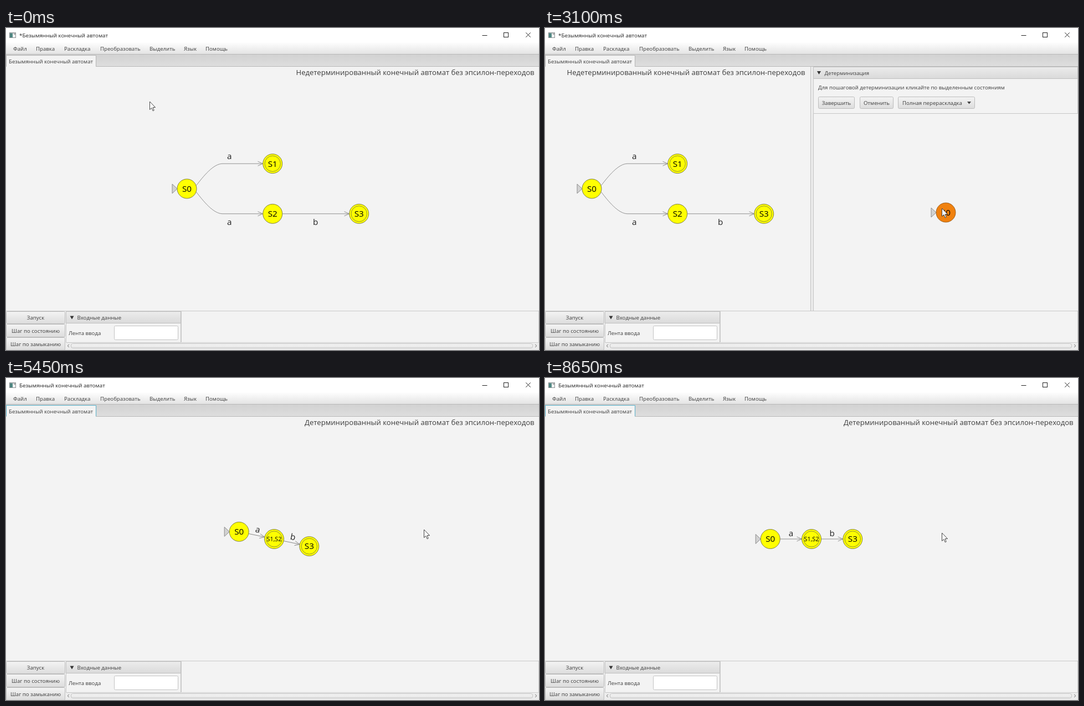
Recreate the animation shown at these times as an HTML page with a canvas. Size 962 by 582 pixels, loop 8.7 s.

```html
<!DOCTYPE html>
<html lang="ru">
<head>
<meta charset="utf-8">
<title>Конечный автомат</title>
<style>
html, body { margin: 0; width: 100%; height: 100%; overflow: hidden; background: #f3f3f3; }
canvas { display: block; }
</style>
</head>
<body>
<canvas id="stage" width="962" height="582"></canvas>
<script>
const ctx = document.getElementById('stage').getContext('2d');
const LOOP = 8700;
const FONT = '"Open Sans", "Noto Sans", sans-serif';
const UI = 9.65;
const INK = '#3c3c3c', EDGE = '#858585', BG = '#f3f3f3';
const YELLOW = '#ffff02', ORANGE = '#f0810f';
const MENU = [['Файл', 13], ['Правка', 54], ['Раскладка', 105], ['Преобразовать', 170],
  ['Выделить', 259], ['Язык', 321], ['Помощь', 360]];

// Moments at which the interface switches state
const MENU_HOVER = 700, MENU_OPEN = 850, MENU_CLOSE = 2000, SPLIT = 2200,
  FIRST_CLICK = 3200, SECOND_CLICK = 4100, DIALOG = 4550, DONE = 5300;

// Rows of [time, values...]
const CURSOR = [[0, 259, 133], [150, 259, 133], [750, 207, 34], [1000, 207, 34], [1550, 250, 93],
  [2250, 250, 93], [2900, 716, 326], [3250, 716, 326], [3700, 753, 335], [4000, 753, 335],
  [4450, 751, 328], [4750, 751, 328], [5100, 763, 273], [5350, 763, 273], [5700, 717, 280],
  [6000, 717, 280], [6500, 716, 280]];
const PAIR = [[FIRST_CLICK, 34, 12.6], [3900, 60.5, 12.6], [SECOND_CLICK, 64, 12.4]];
const TRIPLE = [[SECOND_CLICK, 28, 11], [DIALOG, 36, 10]];
// time, centre x, spacing, angle
const RESULT = [[DONE, 484, 62, 13], [6000, 484, 74.4, 7.2], [6500, 483, 74.5, 3.2],
  [7000, 482, 74.5, 1], [7500, 481.2, 74.5, 0.2], [8650, 481, 74.3, 0]];

function track(rows, t, ease = u => u) {
  if (t <= rows[0][0]) return rows[0].slice(1);
  for (let i = 1; i < rows.length; i++) {
    const a = rows[i - 1], b = rows[i];
    if (t < b[0]) {
      const u = ease((t - a[0]) / (b[0] - a[0]));
      return a.slice(1).map((v, k) => v + (b[k + 1] - v) * u);
    }
  }
  return rows[rows.length - 1].slice(1);
}
const smooth = u => u * u * (3 - 2 * u);

function text(s, x, base, size = UI, color = INK, align = 'left', font = FONT) {
  ctx.font = `${size}px ${font}`;
  ctx.textAlign = align;
  ctx.fillStyle = color;
  ctx.fillText(s, x, base);
}

function line(color, width, ...p) {
  ctx.beginPath();
  ctx.moveTo(p[0], p[1]);
  for (let i = 2; i < p.length; i += 2) ctx.lineTo(p[i], p[i + 1]);
  ctx.strokeStyle = color;
  ctx.lineWidth = width;
  ctx.stroke();
}

function poly(fill, stroke, ...p) {
  ctx.beginPath();
  for (let i = 0; i < p.length; i += 2) ctx.lineTo(p[i], p[i + 1]);
  ctx.closePath();
  ctx.fillStyle = fill;
  ctx.fill();
  if (stroke) {
    ctx.strokeStyle = stroke;
    ctx.lineWidth = 1;
    ctx.stroke();
  }
}

function rect(x, y, w, h, fill) {
  ctx.fillStyle = fill;
  ctx.fillRect(x, y, w, h);
}

function shade(y, h, top, bottom) {
  const g = ctx.createLinearGradient(0, y, 0, y + h);
  g.addColorStop(0, top);
  g.addColorStop(1, bottom);
  return g;
}

function box(x, y, w, h, r, fill, stroke, width = 1) {
  ctx.beginPath();
  ctx.roundRect(x + 0.5, y + 0.5, w - 1, h - 1, r);
  ctx.fillStyle = fill;
  ctx.fill();
  ctx.strokeStyle = stroke;
  ctx.lineWidth = width;
  ctx.stroke();
}

function button(label, x, y, w, h, r = 2) {
  box(x, y, w, h, r, shade(y, h, '#f4f4f4', '#dcdcdc'), '#bcbcbc');
  text(label, x + w / 2, y + h / 2 + 3.5, UI, INK, 'center');
}

function circle(x, y, r, fill, stroke, width = 1) {
  ctx.beginPath();
  ctx.arc(x, y, r, 0, 7);
  if (fill) { ctx.fillStyle = fill; ctx.fill(); }
  if (stroke) { ctx.strokeStyle = stroke; ctx.lineWidth = width; ctx.stroke(); }
}

function icon(x, y, alpha) {
  ctx.globalAlpha = alpha;
  rect(x, y, 12, 10, '#8d9294');
  rect(x + 1, y + 1.5, 10, 7.5, '#f2f2f2');
  rect(x + 1, y + 1.5, 5, 7.5, '#4f8782');
  rect(x + 8, y + 2, 3, 2, '#aaa');
  ctx.globalAlpha = 1;
}

function cross(x, y, r, color) {
  line(color, 1, x - r, y - r, x + r, y + r);
  line(color, 1, x + r, y - r, x - r, y + r);
}

function node(label, x, y, final, fill = YELLOW) {
  const stroke = fill === ORANGE ? '#965918' : '#74743c';
  circle(x, y, 17.5, fill, stroke, 0.9);
  if (final) circle(x, y, 14.2, null, stroke, 0.8);
  const size = label.length > 2 ? 10.8 : 15.2;
  text(label, x, y + size * 0.35, size, '#000', 'center');
}

function startMark(x, y) {
  poly('#d2d2d2', '#8c8c8c', x - 26.5, y - 8.5, x - 26.5, y + 8.5, x - 17.5, y);
}

function arrow(x, y, angle, color) {
  ctx.save();
  ctx.translate(x, y);
  ctx.rotate(angle);
  line(color, 0.9, -9, -4, 0, 0, -9, 4);
  ctx.restore();
}

function sourceGraph(dx) {
  ctx.save();
  ctx.translate(dx, 0);
  for (const side of [-1, 1]) {
    const y = 290.5 + side * 45.3;
    ctx.beginPath();
    ctx.moveTo(343.5, 290.5 + side * 6);
    ctx.bezierCurveTo(356, 290.5 + side * 22, 374, y, 391, y);
    ctx.lineTo(463.5, y);
    ctx.strokeStyle = EDGE;
    ctx.lineWidth = 0.9;
    ctx.stroke();
    arrow(463.5, y, 0, EDGE);
  }
  line(EDGE, 0.9, 499, 335.8, 619.5, 335.8);
  arrow(619.5, 335.8, 0, EDGE);
  text('a', 403.3, 237, 15.2, '#222', 'center');
  text('a', 403.3, 355.7, 15.2, '#222', 'center');
  text('b', 558.7, 355.7, 15.2, '#222', 'center');
  startMark(326.5, 290.5);
  node('S0', 326.5, 290.5);
  node('S1', 481.2, 245.2, true);
  node('S2', 481.2, 335.8);
  node('S3', 637.2, 335.8, true);
  ctx.restore();
}

// Straight row of states around a centre; the last one may be marked as active
function chain(count, cx, cy, gap, degrees, active) {
  const angle = degrees * Math.PI / 180;
  const names = ['S0', 'S1,S2', 'S3'];
  const at = i => {
    const d = (i - (count - 1) / 2) * gap;
    return [cx + d * Math.cos(angle), cy + d * Math.sin(angle)];
  };
  for (let i = 0; i + 1 < count; i++) {
    const fresh = active && i === count - 2;
    const color = fresh ? '#7676b4' : EDGE;
    ctx.save();
    ctx.translate(...at(i));
    ctx.rotate(angle);
    if (gap > 36) {
      line(color, 0.9, 17.5, 0, gap - 17.5, 0);
      arrow(gap - 17.5, 0, 0, color);
    }
    text('ab'[i], gap / 2, -5.3, 15.2, fresh ? '#2a20d8' : '#222', 'center');
    ctx.restore();
  }
  startMark(...at(0));
  for (let i = 0; i < count; i++) {
    node(names[i], ...at(i), i > 0, active && i === count - 1 ? ORANGE : YELLOW);
  }
}

function frame(t) {
  const modal = t >= DIALOG && t < DONE;
  const done = t >= DONE;
  const hot = t >= MENU_HOVER && t < SPLIT - 100;
  const dim = modal ? '#999' : '#222';

  rect(0, 0, 962, 582, BG);
  rect(0, 0, 962, 26, '#fff');
  icon(6, 8, modal ? 0.7 : 1);
  text((done ? '' : '*') + 'Безымянный конечный автомат', 24, 16.6, 9.8, dim);
  line(dim, 1, 859.5, 13.5, 868.5, 13.5);
  ctx.strokeRect(898.5, 8.5, 8, 8);
  cross(942.5, 12.5, 4.2, dim);

  rect(0, 26, 962, 22, shade(26, 22, '#fefefe', '#e2e2e2'));
  if (hot) rect(163, 26, 87, 21.5, '#159fc2');
  MENU.forEach(([s, x], i) => text(s, x, 40.5, UI, hot && i === 3 ? '#fff' : INK));
  rect(0, 47, 962, 1, '#b9b9b9');

  rect(0, 48, 962, 22, shade(48, 22, '#d2d2d2', '#dedede'));
  rect(0, 69, 962, 1, '#b8b8b8');
  rect(1, 50, 161, 20, BG);
  line(done ? '#58b1cb' : '#b5b5b5', 1, 0.5, 69, 0.5, 49.5, 162.5, 49.5, 162.5, 69);
  text('Безымянный конечный автомат', 5, 63.5);
}

function bottomPanel() {
  rect(0, 511, 962, 71, BG);
  rect(0, 511, 962, 1, '#c9c9c9');
  button('Запуск', 0, 512, 107, 23);
  button('Шаг по состоянию', 0, 535, 107, 24);
  button('Шаг по замыканию', 0, 559, 107, 24);
  box(108, 512, 208, 57, 0, BG, '#c6c6c6');
  box(108, 512, 208, 22, 0, shade(512, 22, '#ededed', '#dadada'), '#c0c0c0');
  poly('#333', null, 115.5, 520.5, 122.5, 520.5, 119, 526.5);
  text('Входные данные', 128.5, 527.2);
  text('Лента ввода', 113, 555);
  box(195, 538, 116, 26, 2, '#fff', '#c3c3c3');
  line('#cfcfcf', 1, 316.5, 512, 316.5, 568.5, 961.5, 568.5, 961.5, 512);
  rect(108, 569, 854, 13, '#ececec');
  box(117, 570, 834, 9, 3, shade(570, 9, '#f6f6f6', '#e3e3e3'), '#c0c0c0');
  line('#777', 1, 114, 572, 111, 574.5, 114, 577);
  line('#777', 1, 955, 572, 958, 574.5, 955, 577);
}

function splitPane() {
  rect(479, 70, 5, 441, '#ebebeb');
  rect(479, 70, 1, 441, '#c2c2c2');
  rect(484, 70, 1, 441, '#c2c2c2');
  box(484, 70, 478, 85, 0, BG, '#c6c6c6');
  box(484, 70, 478, 22, 0, shade(70, 22, '#ececec', '#d9d9d9'), '#c0c0c0');
  poly('#333', null, 491, 78, 498, 78, 494.5, 84);
  text('Детерминизация', 504.5, 84.6);
  text('Для пошаговой детерминизации кликайте по выделенным состояниям', 493, 111.4);
  button('Завершить', 493, 124, 66, 22);
  button('Отменить', 568, 124, 61, 22);
  button('', 637, 124, 139, 22);
  text('Полная перераскладка', 645, 138.5);
  poly('#444', null, 762, 133, 769, 133, 765.5, 137.5);
}

function popup() {
  ctx.save();
  ctx.shadowColor = 'rgba(0,0,0,.3)';
  ctx.shadowBlur = 8;
  rect(163, 48, 113, 56, '#f5f5f5');
  ctx.restore();
  line('#c8c8c8', 1, 163.5, 48, 163.5, 103.5, 275.5, 103.5, 275.5, 48);
}

function menuItems(y) {
  popup();
  ['Минимизировать', 'Детерминизировать'].forEach((s, i) => {
    const top = 51 + i * 25;
    const over = y >= top && y < top + 25;
    if (over) rect(164, top, 111, 25, '#159fc2');
    text(s, 171, top + 16.3, UI, over ? '#fff' : INK);
  });
}

function dialog() {
  ctx.save();
  ctx.shadowColor = 'rgba(0,0,0,.35)';
  ctx.shadowBlur = 20;
  ctx.shadowOffsetY = 2;
  rect(155, 142, 653, 155, BG);
  ctx.restore();
  rect(155, 142, 653, 27, '#fff');
  rect(155, 169, 653, 58, shade(169, 58, '#fcfcfc', '#f0f0f0'));
  rect(155, 227, 653, 1, '#c2c2c2');
  ctx.strokeStyle = '#707070';
  ctx.lineWidth = 1;
  ctx.strokeRect(155.5, 142.5, 652, 154);
  icon(163, 150, 1);
  text('Информация', 181, 159.2, 9.8, '#222');
  cross(794, 155, 4.2, '#333');
  text('Преобразование завершено, используйте меню "Раскладка" для раскладки полученного вычислителя',
    165, 202.8, 11.42);
  ctx.save();
  ctx.shadowColor = 'rgba(0,0,0,.35)';
  ctx.shadowBlur = 3;
  circle(777.5, 198.5, 17, '#fff');
  ctx.restore();
  circle(777.5, 198.5, 14.7, shade(184, 29, '#4a78cb', '#3462b8'));
  text('i', 777.5, 206, 20, '#fff', 'center', '"Noto Serif", serif');
  box(733, 265, 66, 23, 2, shade(265, 23, '#b9dce7', '#97c6d6'), '#45b2cf', 1.7);
  text('OK', 765.5, 280, UI, INK, 'center');
}

function pointer(x, y) {
  poly('#fff', '#444', x + 0.5, y, x + 0.5, y + 14.5, x + 3.8, y + 11.5, x + 6.2, y + 16.8,
    x + 8.2, y + 15.9, x + 6, y + 10.7, x + 10.5, y + 10.5);
}

function draw(t) {
  const split = t >= SPLIT && t < DIALOG;
  const [mx, my] = track(CURSOR, t, smooth);
  frame(t);
  const kind = t >= DONE ? 'Детерминированный' : 'Недетерминированный';
  text(kind + ' конечный автомат без эпсилон-переходов', split ? 469.5 : 953.5, 85.2, 13.1, INK, 'right');

  if (t >= DONE) {
    const [cx, gap, angle] = track(RESULT, t);
    chain(3, cx, 291, gap, angle, false);
  } else {
    sourceGraph(split ? -242 : 0);
  }
  if (split) {
    splitPane();
    if (t < FIRST_CLICK) chain(1, 723.5, 333.5, 0, 0, true);
    else if (t < SECOND_CLICK) chain(2, 724.6, 334.2, ...track(PAIR, t), true);
    else chain(3, 724, 334, ...track(TRIPLE, t), true);
  }
  bottomPanel();
  if (t >= MENU_OPEN && t < MENU_CLOSE) menuItems(my);
  if (t >= DIALOG && t < DONE) dialog();
  pointer(Math.round(mx), Math.round(my));
}

const origin = performance.now();
function tick() {
  draw((performance.now() - origin) % LOOP);
  requestAnimationFrame(tick);
}
tick();
</script>
</body>
</html>
```
